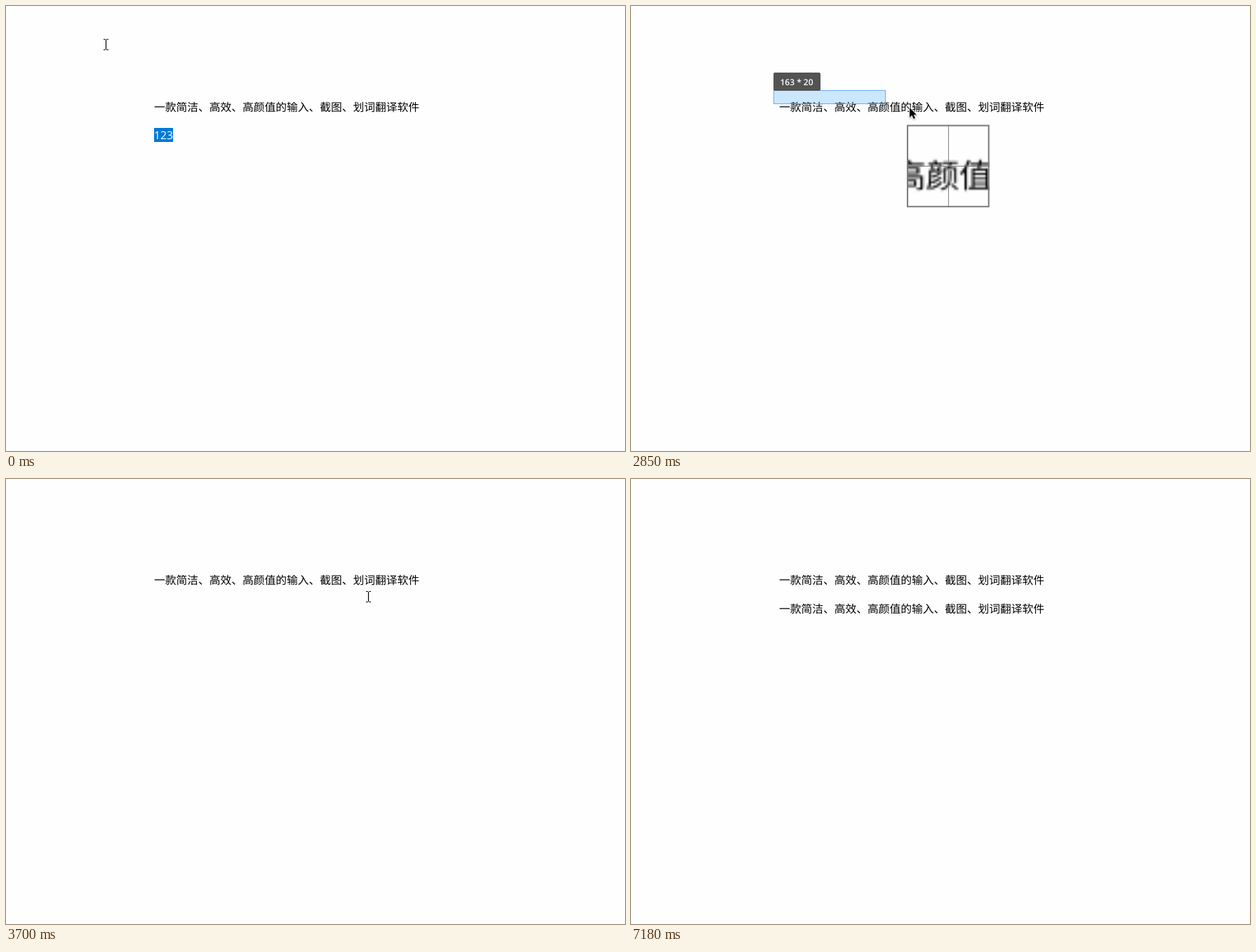
An HTML page with a canvas for the animation above (7.49 s loop, 882 px wide and 635 px high).

```html
<!DOCTYPE html>
<html lang="zh-CN">
<head>
<meta charset="utf-8">
<title>截图翻译</title>
<style>
html, body { margin: 0; width: 100%; height: 100%; overflow: hidden; background: #fefefe; }
canvas { display: block; }
</style>
</head>
<body>
<canvas id="stage" width="882" height="635"></canvas>
<script>
const W = 882, H = 635, LOOP = 7490;
const PAPER = '#fefefe';
const LINE = '一款简洁、高效、高颜值的输入、截图、划词翻译软件';
const CJK = '15.75px "Noto Sans CJK SC", "Noto Sans CJK", sans-serif';
const DIGITS = '15.7px "Open Sans", sans-serif';
const SMALL = '600 12px "Open Sans", sans-serif';
const SCALE = 1.02; // screen pixels per stage pixel

const CUT = { x: 203, y: 120, w: 411, h: 47 };

const easeOut = (p, power) => 1 - (1 - p) ** power;
const within = (t, from, to) => t >= from && t < to;

// Progress from 0 to 1 in equal hard steps, as a screen recorder samples it.
function stepped(t, start, end, steps) {
  const p = Math.min(1, Math.max(0, (t - start) / (end - start)));
  return Math.floor(p * steps + 1e-6) / steps;
}

function between(a, b, px, py = px) {
  return { x: a.x + (b.x - a.x) * px, y: a.y + (b.y - a.y) * py };
}

const spots = {
  start: { x: 142.5, y: 55 },
  entry: { x: 223, y: 188 },
  nearCut: { x: 208, y: 144 },
  cutEnd: { x: 614, y: 168 },
  rest: { x: 248.5, y: 189.5 },
  away: { x: -26, y: -20 }
};

// Text pointer; null while it is hidden.
function beamAt(t) {
  const { start, entry, nearCut, cutEnd, rest, away } = spots;
  if (t < 1450) return between(start, entry, stepped(t, 0, 270, 3));
  if (t < 2270) {
    const from = { x: entry.x, y: entry.y - 3.5 };
    return between(from, nearCut, stepped(t, 1840, 2160, 3));
  }
  if (t < 5530) {
    const p = stepped(t, 3480, 4740, 12);
    return between(cutEnd, rest, easeOut(p, 1.7), p ** 3.2);
  }
  if (t < 6110) return null;
  return between(rest, away, stepped(t, 6590, 7180, 6));
}

// Dragged corner at progress p.
function cornerAt(p) {
  return {
    x: CUT.x + CUT.w * easeOut(p, 2.71),
    y: CUT.y + CUT.h * easeOut(p, 3)
  };
}

const ctx = document.getElementById('stage').getContext('2d', { alpha: false });

const page = document.createElement('canvas');
page.width = W;
page.height = H;

function rect(c, color, x, y, w, h) {
  c.fillStyle = color;
  c.fillRect(x, y, w, h);
}

function text(c, str, x, y, font, color) {
  c.font = font;
  c.textRendering = 'geometricPrecision';
  c.fillStyle = color;
  c.fillText(str, x, y);
}

function drawPage() {
  const c = page.getContext('2d', { alpha: false });
  rect(c, PAPER, 0, 0, W, H);
  text(c, LINE, 211, 149.5, CJK, '#000');
}

function drawCaret(t, on, off, x) {
  if (within(t, on, off)) rect(ctx, '#000', x, 174, 1, 20);
}

function drawEntry(t) {
  if (t < 1160) {
    const marked = !within(t, 560, 760);
    if (marked) rect(ctx, '#0078d7', 211, 174, 27, 20);
    text(ctx, '123', 211, 190, DIGITS, marked ? '#fff' : '#000');
  }
  if (t >= 5220) text(ctx, LINE, 211, 190.5, CJK, '#000');
  drawCaret(t, 1160, 1650, 211);
  drawCaret(t, 4840, 5220, 211);
  drawCaret(t, 5340, 5820, 588);
  drawCaret(t, 6310, 6800, 588);
}

function drawBeam({ x, y }) {
  ctx.save();
  ctx.translate(Math.floor(x) + 0.5, Math.round(y) - 7.5);
  ctx.strokeStyle = '#000';
  ctx.lineWidth = 1.2;
  ctx.beginPath();
  for (const end of [0, 15]) {
    ctx.moveTo(-3.5, end);
    ctx.lineTo(-0.7, end);
    ctx.moveTo(0.7, end);
    ctx.lineTo(3.5, end);
  }
  ctx.moveTo(0, 0.5);
  ctx.lineTo(0, 14.5);
  ctx.stroke();
  ctx.restore();
}

const arrow = new Path2D('M1 1V15L4.3 12L6.7 17L9 16L6.7 11.2H11Z');

function drawArrow({ x, y }) {
  ctx.save();
  ctx.translate(Math.round(x), Math.round(y));
  ctx.shadowColor = 'rgba(0,0,0,.35)';
  ctx.shadowBlur = 2;
  ctx.shadowOffsetY = 1;
  ctx.strokeStyle = '#fff';
  ctx.lineWidth = 1.6;
  ctx.stroke(arrow);
  ctx.shadowColor = 'transparent';
  ctx.fillStyle = '#000';
  ctx.fill(arrow);
  ctx.restore();
}

function drawSelection({ x, y }) {
  const w = x - CUT.x, h = y - CUT.y;
  if (w < 1 || h < 1) return;
  const boxW = Math.round(w), boxH = Math.round(h);
  rect(ctx, 'rgba(0,140,255,.2)', CUT.x, CUT.y, boxW, boxH);
  ctx.strokeStyle = '#69abf2';
  ctx.lineWidth = 1;
  ctx.strokeRect(CUT.x + 0.5, CUT.y + 0.5, boxW - 1, boxH - 1);
  ctx.fillStyle = '#535353';
  ctx.beginPath();
  ctx.roundRect(CUT.x, 95, 67, 26, 2);
  ctx.fill();
  const size = [w, h].map(n => Math.round(n * SCALE)).join(' * ');
  text(ctx, size, 212.5, 113, SMALL, '#fff');
}

function drawLens({ x, y }) {
  const size = 120 / SCALE, zoom = 3, span = size / zoom;
  const left = x + 29.8, top = y + 29.8;
  const midX = Math.round(left + size / 2), midY = Math.round(top + size / 2);
  ctx.drawImage(page, x - span / 2, y - span / 2, span, span, left, top, size, size);
  ctx.save();
  ctx.globalCompositeOperation = 'darken';
  rect(ctx, '#808080', midX, top, 1, size);
  rect(ctx, '#808080', left, midY, size, 1);
  ctx.restore();
  ctx.strokeStyle = '#7a7a7a';
  ctx.lineWidth = 2;
  ctx.strokeRect(left + 1, top + 1, size - 2, size - 2);
}

function drawCapture(t) {
  if (t < 2740) {
    const aim = between({ x: 204, y: 138 }, CUT, stepped(t, 2270, 2650, 3));
    drawLens(aim);
    drawArrow(aim);
    return;
  }
  const p = stepped(t, 2740, 3390, 6);
  const corner = cornerAt(p);
  drawSelection(corner);
  drawLens(corner);
  // The pointer runs slightly ahead of the dragged corner.
  drawArrow(cornerAt(Math.min(1, p + 0.042)));
}

function render(now) {
  const t = now % LOOP;
  ctx.drawImage(page, 0, 0);
  drawEntry(t);
  if (within(t, 2270, 3590)) {
    drawCapture(t);
  } else {
    const beam = beamAt(t);
    if (beam) drawBeam(beam);
  }
}

function tick() {
  render(performance.now());
  requestAnimationFrame(tick);
}

drawPage();
tick();
</script>
</body>
</html>
```
